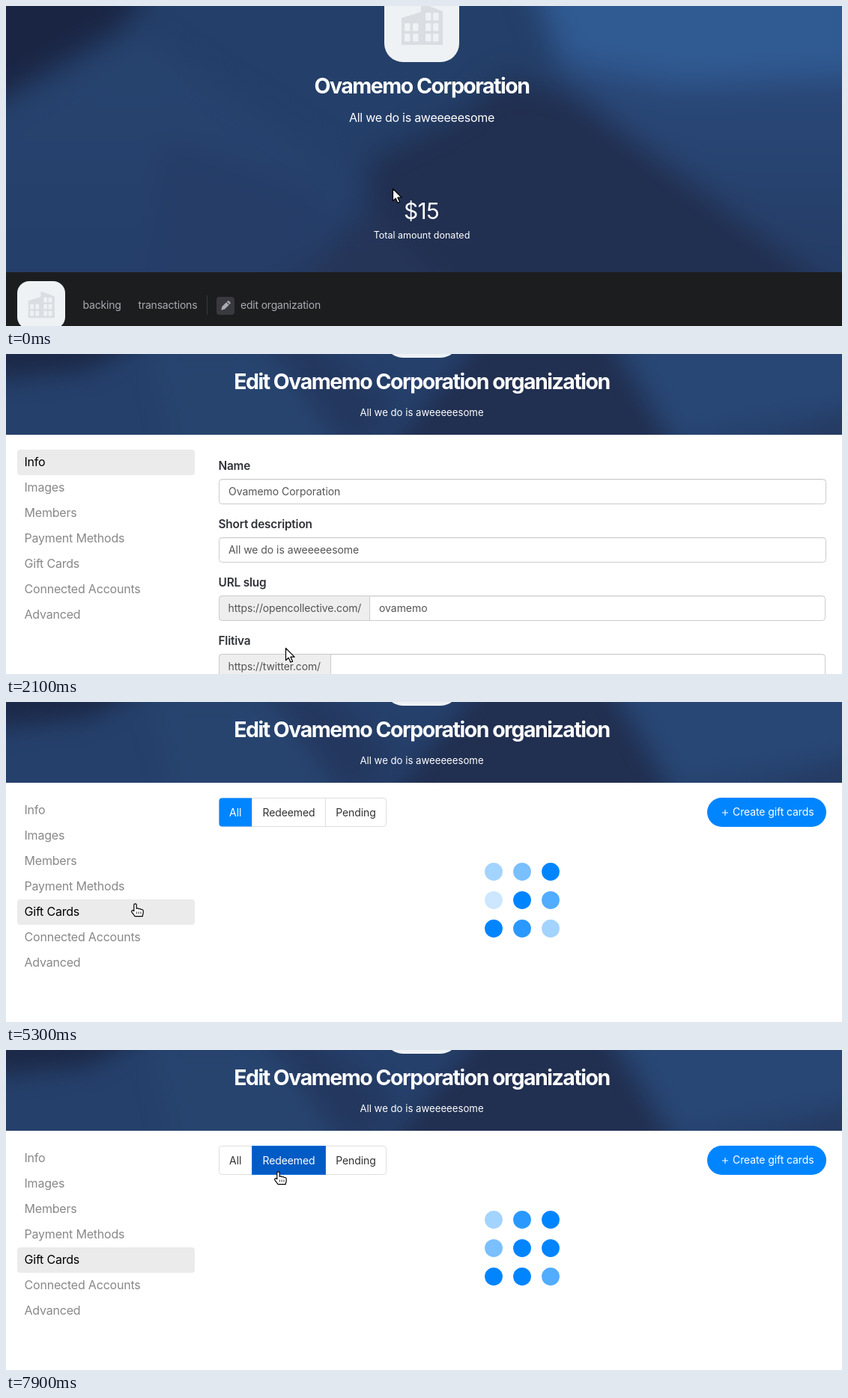
These frames come from a looping animation (1116x428 px, 8 s). An HTML page:

```html
<!DOCTYPE html>
<html lang="en">
<head>
<meta charset="utf-8">
<title>Gift cards walkthrough</title>
<style>
  html, body { margin: 0; width: 100%; height: 100%; overflow: hidden; background: #fff; }
  svg { display: block; }
  text { font-family: Inter, "Noto Sans", sans-serif; font-optical-sizing: none; white-space: pre; }
</style>
</head>
<body>
<svg id="stage" width="1116" height="428" viewBox="0 0 1116 428"></svg>
<script>
const LOOP = 8000, STEP = 100;
const EDIT_AT = 2100, CARDS_AT = 4900, LIST_AT = 5900, FILTER_AT = 7500, RELOAD_AT = 7700;
const BLUE = '#0085ff', LINK = '#0f7fdb';
const ORG = 'Ovamemo Corporation', SLUG = 'ovamemo', TAGLINE = 'All we do is aweeeeesome';
const MENU = ['Info', 'Images', 'Members', 'Payment Methods', 'Gift Cards', 'Connected Accounts', 'Advanced'];

const text = (x, y, size, str, fill, extra = '') =>
  `<text x="${x}" y="${y}" font-size="${size}" fill="${fill}" ${extra}>${str}</text>`;
const middle = 'text-anchor="middle"';
const title = (y, str) => text(555, y, 28.5, str, '#fff', middle + ' font-weight="700" letter-spacing="-1.5"');
const rect = (x, y, w, h, fill, extra = '') =>
  `<rect x="${x}" y="${y}" width="${w}" height="${h}" fill="${fill}" ${extra}/>`;
const poly = (points, fill) => `<polygon points="${points}" fill="${fill}"/>`;
const gradient = (id, from, to, vertical) =>
  `<linearGradient id="${id}" ${vertical ? 'x2="0" y2="1"' : ''}><stop stop-color="${from}"/><stop offset="1" stop-color="${to}"/></linearGradient>`;
const blur = (id, size) =>
  `<filter id="${id}" x="-20%" y="-40%" width="140%" height="180%" color-interpolation-filters="sRGB"><feGaussianBlur stdDeviation="${size}"/></filter>`;

// Blurred facets behind the page header
const backdrop = (height, base, filter, facets) =>
  `<svg width="1116" height="${height}" overflow="hidden">${rect(0, 0, 1116, height, base)}
   <g filter="url(#${filter})">${facets.map(f => poly(...f)).join('')}</g></svg>`;

function avatar(x, y, size) {
  let panes = '';
  for (const px of [27, 38, 55, 65])
    for (const py of px > 50 ? [34, 48, 62] : [48, 62])
      panes += rect(px, py, 7.5, 10.5, '#eef2f4', 'rx="1.5"');
  return `<g transform="translate(${x} ${y}) scale(${size / 100})">
    ${rect(0, 0, 100, 100, '#eef2f4', 'rx="25"')}
    ${poly('23,77 23,41 49,33 49,21 78,32 78,77', '#dadde1')}${panes}</g>`;
}

const profile = () => backdrop(356, '#243f69', 'soft', [
  ['180,40 480,235 400,400 -60,400 -60,160', 'url(#leftFacet)'],
  ['210,180 420,260 380,400 190,400', '#253d67'],
  ['-60,-60 200,-60 160,25 -60,155', '#1a2543'],
  ['350,400 480,270 690,400', '#253558'],
  ['690,-60 1180,-60 1180,420 1100,400 860,215 745,100', 'url(#rightFacet)'],
  ['690,-60 1180,-60 1180,90 900,105 745,75', '#305a92'],
  ['600,150 670,95 760,120 1090,370 1090,400 620,400 480,260 485,205', '#212f50']
]) + avatar(505, -25, 100)
  + title(117, ORG)
  + text(555, 155, 16, TAGLINE, '#fff', middle + ' letter-spacing="-.26"')
  + text(554.5, 285, 30, '$15', '#fff', middle + ' letter-spacing="-.7"')
  + text(555, 311, 12.5, 'Total amount donated', '#fff', middle)
  + rect(0, 356, 1116, 72, '#1c1d1f') + avatar(15, 368, 64)
  + text(102.5, 405, 14, 'backing', '#a9abb0', 'letter-spacing="-.2"')
  + text(176.5, 405, 14, 'transactions', '#a9abb0', 'letter-spacing="-.2"')
  + rect(268, 387, 1, 26, '#38393c') + rect(281, 389, 24, 24, '#3a393f', 'rx="4"')
  + `<g id="edit"><g transform="translate(293 401) rotate(45)">
      <path d="M-2.5-4.2h5v8.2l-2.5 4-2.5-4zM-2.5-5.2v-1.6q0-1 1-1h3q1 0 1 1v1.6z"/></g>
     ${text(313, 405, 14, 'edit organization', 'inherit', 'letter-spacing="-.2"')}</g>`;

const editHeader = () => backdrop(108, '#25406b', 'softer', [
  ['-50,-50 240,-50 110,22 -50,38', '#1c2948'],
  ['190,-10 330,-10 480,90 400,140 230,140', '#27446f'],
  ['340,-30 400,-30 520,70 470,140 430,100', '#24385f'],
  ['650,-40 790,-40 895,140 500,140 560,70', '#212f50'],
  ['810,-40 1170,-40 1170,60 900,110', '#294775'],
  ['1000,140 1170,50 1170,140', '#263b63']
]) + rect(505, -95, 100, 100, '#eef2f4', 'rx="25"')
  + title(47, `Edit ${ORG} organization`)
  + text(555, 83, 13.2, TAGLINE, '#fff', middle);

const sidebar = () => rect(15, 128, 237, 34, '#ebebeb', 'rx="4" id="active"')
  + MENU.map((name, i) => text(24.5, 150 + 34 * i, 16, name, '#888', 'class="item" letter-spacing="-.2"')).join('');

function field(y, label, value, prefix, addon) {
  const w = prefix ? 809 : 810, x = prefix ? 284 + addon + 13 : 297;
  const border = 'rx="4" stroke="#ccc"';
  let out = text(283.5, y - 12, 15.4, label, '#2f3137', 'font-weight="600" letter-spacing="-.2"')
    + rect(284.5, y + .5, w, 33, '#fff', border)
    + rect(286, y + 1, w - 3, 1, '#000', 'opacity=".06"');
  if (prefix) out += `<path d="M${284.5 + addon} ${y + .5}h${4 - addon}q-4 0-4 4v25q0 4 4 4h${addon - 4}z" fill="#eee" stroke="#ccc"/>`
    + text(296.5, y + 22, 14, prefix, '#555', 'letter-spacing="-.15"');
  return out + text(x, y + 22, 14, value, '#555', 'letter-spacing="-.05"');
}

const form = () => field(167, 'Name', ORG) + field(245, 'Short description', TAGLINE)
  + field(323, 'URL slug', SLUG, 'https://opencollective.com/', 201)
  + field(401, 'Flitiva', '', 'https://twitter.com/', 149);

const toolbar = () => rect(284.5, 128.5, 223, 38, '#fff', 'rx="4" stroke="#dcdee0"')
  + '<path d="M426.5 129v37" stroke="#dcdee0"/>'
  + '<path id="all" d="M328.5 128.5h-40q-4 0-4 4v30q0 4 4 4h40z"/>'
  + rect(328.5, 128.5, 98, 38, '#fff', 'id="redeemed"')
  + text(306.3, 153, 14, 'All', '#fff', middle + ' id="allText"')
  + text(377.5, 153, 14, 'Redeemed', '#313233', middle + ' id="redeemedText" letter-spacing="-.1"')
  + text(467, 153, 14, 'Pending', '#313233', middle + ' letter-spacing="-.1"')
  + rect(936, 128, 159, 39, BLUE, 'rx="19.5"')
  + '<path d="M956 148h8M960 144v8" stroke="#fff" stroke-width="1.1"/>'
  + text(970, 152, 14, 'Create gift cards', '#fff', 'letter-spacing="-.1"');

function card(y, colors, status, balance) {
  const id = 'card' + y;
  return gradient(id, ...colors) + rect(284.5, y + .5, 39, 27, '#fff', 'rx="2" stroke="#d5dae0"')
    + `<path d="M284 ${y + 2}q0-2 2-2h36q2 0 2 2v14c-9-2-14 1-19 5s-13 4-21 3z" fill="url(#${id})"/>`
    + text(345.5, y + 13, 16, `<tspan font-weight="700">$5.00</tspan> ${status}`, '#313233', 'letter-spacing="-.2"')
    + text(345.5, y + 36, 14, `Balance: ${balance} | <tspan fill="${LINK}">View Details</tspan>`, '#9d9fa3', 'letter-spacing="-.1"');
}

const list = () => card(205, ['#17bd62', '#20df86'], `claimed by <tspan fill="${LINK}">Brovo</tspan>`, '$1.70')
  + '<circle cx="312" cy="235" r="12" fill="url(#photo)"/>'
  + '<path d="M306 245.4q0-8 4-9.5a3.7 4 0 1 1 4.5 0q4 1.5 4 9.3a12 12 0 0 1-12.5.2z" fill="#20140f"/>'
  + rect(284, 267, 811, 1, '#e8e9eb')
  + card(294, ['#f8cd55', '#fbd34e'], 'not yet claimed', '$5.00');

// Start delay of each dot's pulse, row by row
const DELAYS = [0, 300, 800, 100, 600, 400, 700, 500, 200];
const loader = () => DELAYS.map((_, i) =>
  `<circle class="dot" cx="${651 + 38 * (i % 3)}" cy="${227 + 38 * Math.floor(i / 3)}" r="11.9" fill="${BLUE}"/>`).join('');

const pointer = () => `<g id="cursor" stroke="#000" stroke-width="1.2" stroke-linejoin="round">
  <path id="arrow" d="M0 0v16.2l3.7-3.5 2.7 6.1 2.7-1.2-2.7-5.9h5.2z" fill="#fff"/>
  <g id="hand">
    <path d="M-1.7 10V2a1.7 1.7 0 0 1 3.4 0v4.8c1-.8 2.7-.5 3.1.5 1.1-.6 2.6-.2 3 .8 1.4-.4 2.9.4 2.9 1.9v2.5c0 1.9-1 2.6-1 4.7H-.5c-.5-2-3.7-4.2-4.3-6.2-.4-1.6 1.6-2.5 3.1-1z" fill="#fff"/>
    <path d="M1.8 11v3M4.6 11v3M7.4 11v3" fill="none" stroke-width=".8"/>
  </g></g>`;

const group = (id, body) => `<g id="${id}">${body}</g>`;
document.getElementById('stage').innerHTML = `<defs>
  ${blur('soft', 19)}${blur('softer', 15)}
  ${gradient('leftFacet', '#27446f', '#253e6a', true)}
  ${gradient('rightFacet', '#2c4f84', '#243a61', true)}
  <radialGradient id="photo"><stop stop-color="#d08a3c"/><stop offset=".6" stop-color="#8a5228"/><stop offset="1" stop-color="#3a2418"/></radialGradient>
  </defs>`
  + group('profile', profile())
  + group('editor', editHeader() + sidebar() + group('form', form())
    + group('cards', toolbar() + group('list', list()) + group('loader', loader())))
  + pointer();

const el = id => document.getElementById(id);
const items = document.querySelectorAll('.item'), dots = document.querySelectorAll('.dot');
const show = (id, on) => { el(id).style.display = on ? '' : 'none'; };
const fill = (id, color) => el(id).setAttribute('fill', color);

// Pointer path: time, x, y, eased
const PATH = [
  [300, 516, 244], [1000, 382, 400, true], [1200, 373, 393],
  [2800, 373, 393], [3000, 387, 403], [3700, 178, 269, true], [3800, 170, 269],
  [4500, 170, 269], [4600, 172, 269], [5900, 172, 269], [6200, 218, 270],
  [6700, 360, 161], [6800, 361, 163], [7000, 363, 162]
];

function pointerAt(t) {
  const n = PATH.findIndex(key => key[0] >= t);
  if (n <= 0) return (n ? PATH[PATH.length - 1] : PATH[0]).slice(1, 3);
  const a = PATH[n - 1], b = PATH[n];
  let k = (t - a[0]) / (b[0] - a[0]);
  if (b[3]) k = k * k * (3 - 2 * k);
  return [a[1] + (b[1] - a[1]) * k, a[2] + (b[2] - a[2]) * k];
}

function pulse(ms) {
  if (ms < 0) return 1;
  return .2 + 1.6 * Math.abs(.5 - (ms % 1000) / 1000);
}

function draw(t) {
  const [x, y] = pointerAt(t);
  const inside = (l, top, r, bottom) => x >= l && x < r && y >= top && y < bottom;
  const editing = t >= EDIT_AT, cards = t >= CARDS_AT, filtered = t >= FILTER_AT;
  const listed = t >= LIST_AT && t < RELOAD_AT;
  show('profile', !editing);
  show('editor', editing);
  show('form', !cards);
  show('cards', cards);
  show('list', listed);
  show('loader', !listed);

  const onEdit = !editing && inside(281, 385, 425, 416);
  fill('edit', onEdit ? '#fff' : '#a9abb0');

  const current = cards ? 4 : 0;
  const hovered = editing && inside(15, 128, 252, 366) ? Math.floor((y - 128) / 34) : -1;
  el('active').setAttribute('y', 128 + 34 * current);
  items.forEach((item, i) => item.setAttribute('fill', i === current || i === hovered ? '#000' : '#888'));

  const onTab = cards && inside(328, 128, 427, 167);
  fill('all', filtered ? 'none' : BLUE);
  fill('allText', filtered ? '#313233' : '#fff');
  fill('redeemed', filtered ? '#005bc4' : '#fff');
  el('redeemed').setAttribute('stroke', filtered ? '#0a6fdb' : onTab ? '#66b8ff' : '#dcdee0');
  fill('redeemedText', filtered ? '#fff' : onTab ? '#3399ff' : '#313233');

  const began = filtered ? FILTER_AT : CARDS_AT - 200;
  dots.forEach((dot, i) => dot.setAttribute('fill-opacity', pulse(t - began - DELAYS[i])));

  const hand = (onEdit && t < 1900) || hovered >= 0 || onTab;
  show('hand', hand);
  show('arrow', !hand);
  el('cursor').setAttribute('transform', `translate(${Math.round(x) + .5} ${Math.round(y) + .5})`);
}

const start = performance.now();
function tick() {
  const t = (performance.now() - start) % LOOP;
  draw(Math.floor(t / STEP) * STEP);
  requestAnimationFrame(tick);
}
tick();
</script>
</body>
</html>
```
